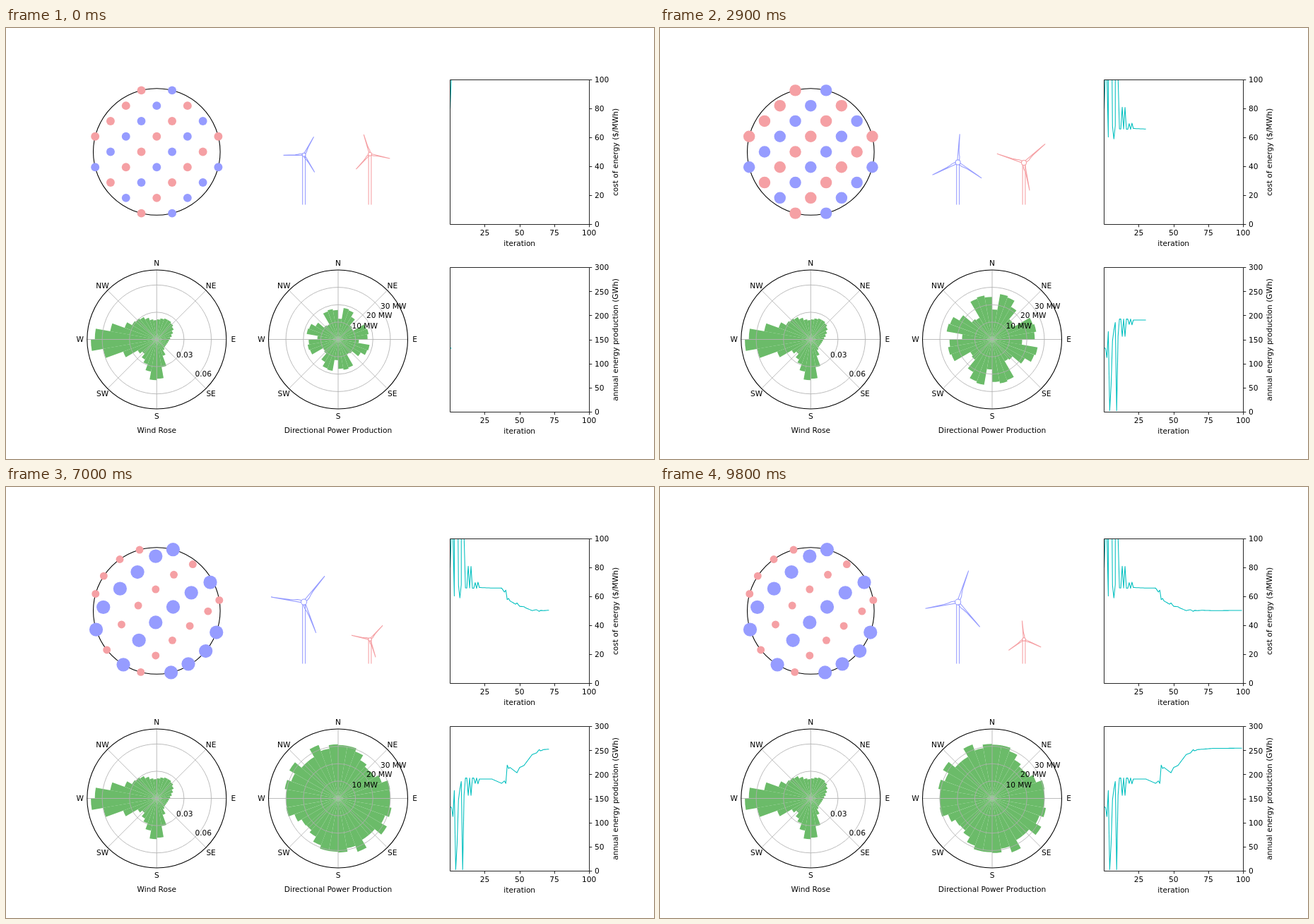
Recreate the animation shown at these times as an HTML page with a canvas. Size 917 by 611 pixels, loop 9900 ms.

```html
<!DOCTYPE html>
<html lang="en">
<head>
<meta charset="utf-8">
<title>Wind farm optimisation</title>
<style>
  html, body { margin: 0; width: 100%; height: 100%; overflow: hidden; background: #fff; }
  canvas { display: block; }
</style>
</head>
<body>
<canvas id="stage" width="917" height="611"></canvas>
<script>
const ctx = document.getElementById('stage').getContext('2d');
const STEP = 100, STEPS = 99;
const BLUE = '#969cff', RED = '#f5a0a4', GREEN = '#6bbb69', CYAN = '#00bfbf', GREY = '#b0b0b0';
const THIN = 0.85, LINE = 1.06, TAU = Math.PI * 2, DEG = Math.PI / 180;

const lerp = (a, b, u) => a + (b - a) * u;

// Piecewise linear value of [x, value] keys
function at(keys, x) {
  let k = 0;
  while (k < keys.length - 2 && x >= keys[k + 1][0]) k++;
  const [x0, a] = keys[k], [x1, b] = keys[k + 1];
  return lerp(a, b, Math.min(1, Math.max(0, (x - x0) / (x1 - x0))));
}

// The design changes in stages; each design value has one entry per stage.
const STAGES = [0, 5, 29, 46, 68];
const staged = (values, i) => at(STAGES.map((s, k) => [s, values[k]]), i);

// Energy: trial steps of the optimiser, then a steady climb
const trials = [
  133, 132, 113, 167, 3, 56, 148, 170, 186, 3, 157,
  193, 193, 157, 193, 157, 193, 193, 182, 193, 181
];
const climb = [
  [21, 191], [30, 191], [37, 182], [39, 187], [40, 182], [41, 220], [42, 213], [43, 215], [48, 204],
  [50, 215], [53, 219], [59, 242], [62, 245], [64, 252], [65, 249.5], [67, 252], [78, 254.5], [99, 255]
];
const energy = n => n < trials.length ? trials[n] : at(climb, n);

// Cost per unit is the yearly spend over the energy produced.
const spend = [
  [0, 10640], [1, 14000], [2, 11600], [3, 10100], [7, 10050], [8, 12700], [10, 16000], [11, 12750],
  [30, 12600], [40, 11740], [41, 12760], [47, 11300], [54, 11680], [62, 12500], [70, 12790], [99, 12880]
];
const cost = n => at(spend, n) / energy(n);

const turbines = [
  { x: 515, color: RED, turn: 13.8, speed: -6,
    hub: [71.8, 60.3, 59.5, 32.5, 34.5], blade: [29, 40.2, 40.2, 25.8, 26.6] },
  { x: 421.6, color: BLUE, turn: 60, speed: -5,
    hub: [70.8, 60.3, 60, 80.5, 87.4], blade: [29, 40.2, 40.2, 42.2, 47] }
];
const profile = [
  [3, -1.5], [7, -1.5], [10, -0.7], [15, 0], [35, 0.8], [30, 0.9], [3, 0.9]
];

// Farm: a diagonal grid inside a circle, colours alternating along each row
const FARM = { x: 213.3, y: 175.5, r: 89.8, pitch: 21.78 };
const places = [];
for (let row = -4; row <= 4; row++) {
  let count = [0, 1, 3].includes(row) ? 1 : 0;
  for (let col = -4; col <= 4; col++) {
    if ((row + col) % 2 && Math.hypot(row, col) < 4.2) {
      places.push({ x: col * FARM.pitch, y: row * FARM.pitch, turbine: turbines[count++ % 2] });
    }
  }
}

// Smooth drift that pushes the turbines outwards
function drift(x, y) {
  const u = x / 90, v = y / 90;
  return [
    12 * u - 9 * u * v - 1.5,
    7 * v - 7 + (4 - 8 * v) * u + (9 + 18 * v + 62 * v * v) * u * u
  ];
}

// Wind rose: lobes as [bin, height, width] on a constant floor, 10 degrees per bin
const lobes = [[2.6, 17, 3.2], [17.6, 44, 1.5], [20.8, 14, 1], [26.2, 78, 1.75], [31.2, 21, 2]];
const windBars = Array.from({ length: 36 }, (_, n) => lobes.reduce((sum, [bin, height, width]) => {
  const d = (n - bin + 54) % 36 - 18;
  return sum + height * Math.exp(-d * d / (2 * width * width));
}, 15));

// Power rose: the pattern repeats around the circle and scales with the energy
const powerShapes = [
  { total: 193, bars: [43, 66, 64, 54, 38, 36, 62, 64, 61] },
  { total: 207, bars: [56, 67, 64, 51, 31, 35, 57, 66, 68, 56, 63, 56, 68, 46, 56, 69, 56, 69] },
  { total: 254, bars: [76, 76, 71, 63, 59, 60, 66, 75, 74, 74, 77, 71, 80, 68, 68, 81, 72, 77] }
];
function powerBars(i) {
  const pos = staged([0, 0, 0, 1, 2], i), k = Math.min(1, Math.floor(pos));
  const share = ({ bars, total }, n) => bars[n % bars.length] / total;
  return windBars.map((_, n) =>
    energy(i + 1) * lerp(share(powerShapes[k], n), share(powerShapes[k + 1], n), pos - k));
}

function text(str, x, y, align = 'center') {
  ctx.fillStyle = '#000';
  ctx.font = '10.6px "DejaVu Sans", sans-serif';
  ctx.textAlign = align;
  ctx.fillText(str, x, y + 3.9);
}
function stroke(color, width) {
  ctx.strokeStyle = color;
  ctx.lineWidth = width;
  ctx.stroke();
}
function fill(color) {
  ctx.fillStyle = color;
  ctx.fill();
}
function circle(x, y, r) {
  ctx.beginPath();
  ctx.arc(x, y, r, 0, TAU);
}
function segment(x1, y1, x2, y2, color, width = THIN) {
  ctx.beginPath();
  ctx.moveTo(x1, y1);
  ctx.lineTo(x2, y2);
  stroke(color, width);
}

function drawFarm(i) {
  circle(FARM.x, FARM.y, FARM.r);
  stroke('#000', LINE);
  const amount = staged([0, 0, 0, 0.15, 1], i);
  places.forEach(({ x, y, turbine }) => {
    const [dx, dy] = drift(x, y);
    const px = x + dx * amount, py = y + dy * amount;
    const inside = Math.min(1, FARM.r / Math.hypot(px, py));
    circle(FARM.x + px * inside, FARM.y + py * inside, staged(turbine.blade, i) * 0.205);
    fill(turbine.color);
  });
}

function drawTurbine({ x, color, turn, speed, hub, blade }, i) {
  const ground = 250.5, hubY = ground - staged(hub, i), scale = staged(blade, i) / 35;
  for (const side of [-1.9, 1.9]) segment(x + side, ground, x + side, hubY, color, LINE);
  for (let k = 0; k < 3; k++) {
    ctx.save();
    ctx.translate(x, hubY);
    ctx.rotate((turn + speed * i + 120 * k) * DEG);
    ctx.beginPath();
    profile.forEach(([along, up]) => ctx.lineTo(along * scale, -up * scale));
    ctx.closePath();
    stroke(color, LINE);
    ctx.restore();
  }
  circle(x, hubY, 3 * scale);
  fill('#fff');
  stroke(color, LINE);
}

function drawRose(cx, bars, rings, labels, title) {
  const cy = 441.5, outer = 98.5;
  bars.forEach((r, n) => {
    const from = (n * 10 - 90) * DEG;
    ctx.beginPath();
    ctx.moveTo(cx, cy);
    ctx.arc(cx, cy, r, from, from + 10 * DEG);
    fill(GREEN);
  });
  rings.forEach(r => { circle(cx, cy, r); stroke(GREY, THIN); });
  ['E', 'SE', 'S', 'SW', 'W', 'NW', 'N', 'NE'].forEach((name, k) => {
    const c = Math.cos(k * 45 * DEG), s = Math.sin(k * 45 * DEG);
    segment(cx, cy, cx + outer * c, cy + outer * s, GREY);
    text(name, cx + 108.6 * c, cy + 108.6 * s);
  });
  circle(cx, cy, outer);
  stroke('#000', LINE);
  labels.forEach(([str, x, y]) => text(str, x, y, 'left'));
  text(title, cx, 570);
}

function drawChart(top, max, step, label, history, i) {
  const left = 628.5, width = 197, height = 205, right = left + width, bottom = top + height;
  const px = x => left + x * width / 100, py = v => bottom - v * height / max;
  const crisp = p => Math.floor(p) + 0.5;
  ctx.save();
  ctx.beginPath();
  ctx.rect(left, top, width, height);
  ctx.clip();
  ctx.beginPath();
  for (let n = 0; n <= i + 1; n++) ctx.lineTo(px(n), py(history(n)));
  ctx.lineJoin = 'round';
  stroke(CYAN, LINE);
  ctx.restore();
  ctx.beginPath();
  ctx.rect(left, top, width, height);
  stroke('#000', THIN);
  for (let x = 25; x <= 100; x += 25) {
    segment(crisp(px(x)), bottom, crisp(px(x)), bottom + 3.8, '#000');
    text(x, px(x) - 0.3, bottom + 11.6);
  }
  for (let v = 0; v <= max; v += step) {
    segment(right, crisp(py(v)), right + 3.8, crisp(py(v)), '#000');
    text(v, right + 7.4, py(v), 'left');
  }
  text('iteration', left + width / 2 - 0.3, bottom + 26.5);
  ctx.save();
  ctx.translate(861.7, top + height / 2);
  ctx.rotate(-Math.PI / 2);
  text(label, 0, 0);
  ctx.restore();
}

function draw(i) {
  ctx.fillStyle = '#fff';
  ctx.fillRect(0, 0, 917, 611);
  drawFarm(i);
  turbines.forEach(t => drawTurbine(t, i));
  drawRose(213.3, windBars, [38.6, 77.2], [['0.03', 241, 463.5], ['0.06', 267.5, 490.5]], 'Wind Rose');
  drawRose(470, powerBars(i), [24.6, 49.25, 73.9],
    [['10 MW', 489.5, 422], ['20 MW', 510, 407.5], ['30 MW', 530, 394]], 'Directional Power Production');
  drawChart(73.5, 100, 20, 'cost of energy ($/MWh)', cost, i);
  drawChart(339.5, 300, 50, 'annual energy production (GWh)', energy, i);
}

const start = performance.now();
function tick() {
  draw(Math.floor((performance.now() - start) / STEP) % STEPS);
  requestAnimationFrame(tick);
}
tick();
</script>
</body>
</html>
```
